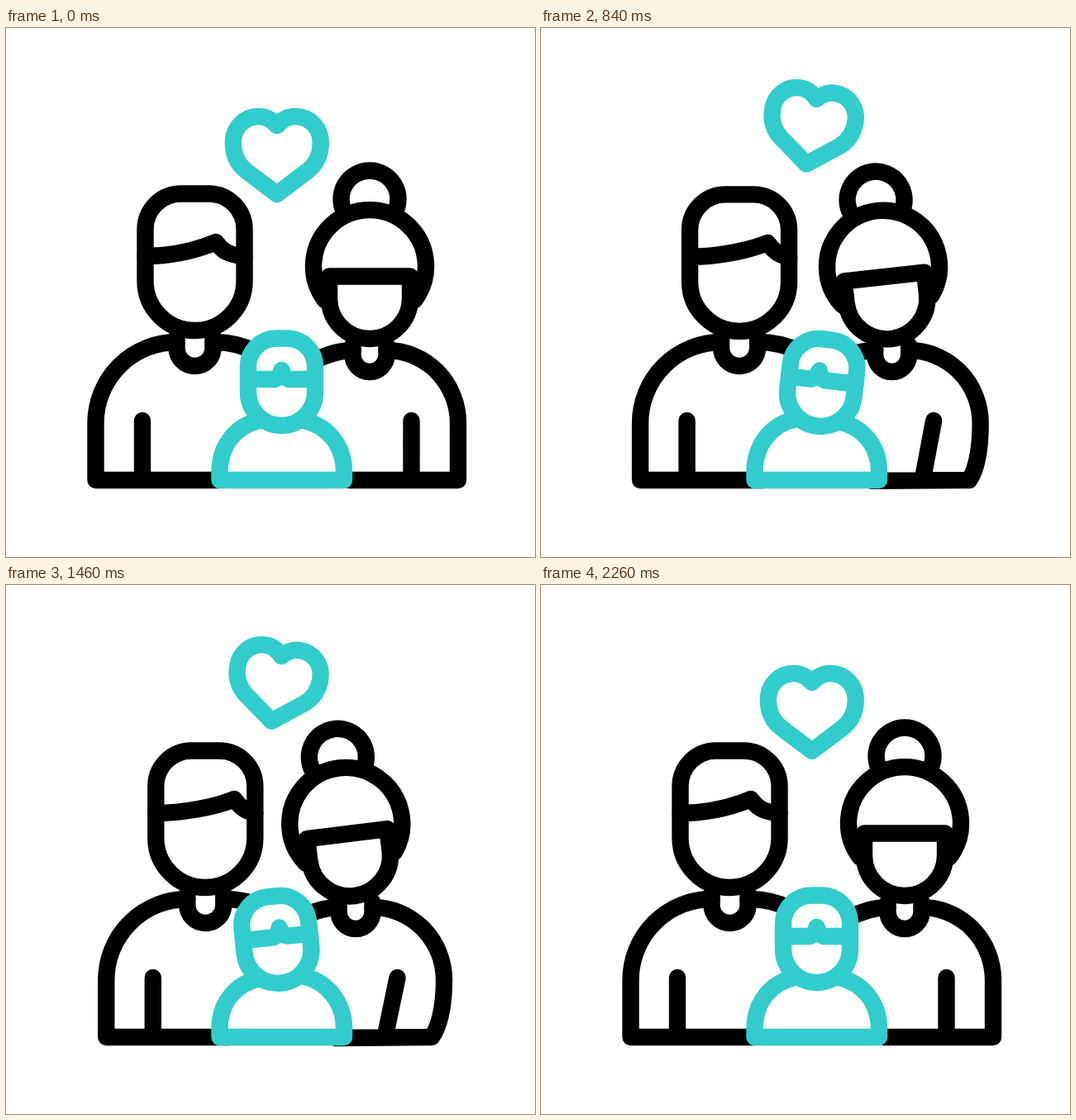
These frames come from a looping animation (640x640 px, 2300 ms). An HTML page:

```html
<!DOCTYPE html>
<html lang="en">
<head>
<meta charset="utf-8">
<title>Family</title>
<style>
  html, body { margin: 0; height: 100%; overflow: hidden; background: #fff; }
  svg { display: block; width: 100%; height: 100%; }
  path { vector-effect: non-scaling-stroke; }
</style>
</head>
<body>
<svg viewBox="0 0 640 640" fill="none" stroke="#000" stroke-width="20.4" stroke-linecap="round" stroke-linejoin="round">
  <g id="man">
    <path d="M206.500 380A98 98 0 0 0 108.500 478V547H258M165 475V547M250.500 380C267 380 284 383 300 391"/>
    <path d="M206.500 374V387A22 22 0 0 0 250.500 387V374"/>
    <g id="manHead">
      <path d="M168.500 243.500A43 43 0 0 1 211.500 200.500H245.500A43 43 0 0 1 288.500 243.500V306A60 60 0 0 1 168.500 306Z"/>
      <path id="manHair"/>
    </g>
  </g>
  <g id="woman">
    <path id="womanBody"/>
    <path d="M419.500 384V395.500A20.500 20.500 0 0 0 460.500 395.500V384"/>
    <g id="womanHead">
      <path d="M410 224A34.500 34.500 0 1 1 470 224"/>
      <path d="M386 329.500A68 68 0 1 1 494 329.500"/>
      <path d="M391 300.500H489V327A49 49 0 0 1 391 327Z"/>
    </g>
  </g>
  <g stroke="#33cccc">
    <path id="childBody" fill="#fff"/>
    <g id="childHead">
      <path fill="#fff" d="M293 409.500A34 34 0 0 1 327 375.500H340A34 34 0 0 1 374 409.500V440.500A40.500 40.500 0 0 1 293 440.500Z"/>
      <path id="childHair"/>
    </g>
    <path id="heart" d="M0 -36C-6 -43 -14 -47 -22 -47C-40 -47 -53 -33 -53 -15C-53 2 -46 12 -37 19L0 47L37 19C46 12 53 2 53 -15C53 -33 40 -47 22 -47C14 -47 6 -43 0 -36Z"/>
  </g>
</svg>
<script>
const LOOP = 2300, HALF = LOOP / 2, QUARTER = LOOP / 4;
const el = id => document.getElementById(id);
const move = (id, transform) => el(id).setAttribute('transform', transform);
const draw = (id, d) => el(id).setAttribute('d', d);
const clamp = v => Math.min(1, Math.max(0, v));

// Cubic Bézier easing, solved by bisection
function bezier(x1, y1, x2, y2) {
  const at = (a, b, s) => 3 * a * s * (1 - s) ** 2 + 3 * b * s * s * (1 - s) + s ** 3;
  return x => {
    let low = 0, high = 1;
    for (let i = 0; i < 24; i++) {
      const mid = (low + high) / 2;
      if (at(x1, x2, mid) < x) low = mid; else high = mid;
    }
    return at(y1, y2, low);
  };
}
const ease = bezier(.25, .1, .25, 1);
const easeIn = bezier(.45, 0, .85, .85);
const easeInOut = bezier(.5, 0, .5, 1);
const smooth = x => x * x * (3 - 2 * x);
const arch = x => Math.sin(Math.PI * x) ** 2;
const span = (t, from, to, curve) => curve(clamp((t - from) / (to - from)));

function adults(t) {
  const lean = span(t, 0, 1340, ease) - span(t, 1460, 2060, ease);
  const bob = 2.6 * (span(t, 0, 700, arch) + span(t, 700, 1400, arch));
  move('man', `translate(${12.8 * lean} 0)`);
  move('manHead', `translate(0 ${bob})`);
  const peak = 254 + 9.5 * lean;
  draw('manHair', `M168.500 276C200 276 ${peak - 24} 269 ${peak} 259C${peak + 7} 269 ${peak + 15} 275 288.500 276`);

  move('woman', `translate(${-17 * lean} 0)`);
  move('womanHead', `rotate(${-7 * lean} 440 385)`);
  draw('womanBody', `M372 403C390 394 405 390 419.500 390M460.500 390A86.500 88 0 0 1 547 478` +
    `C547 510 ${547 - 6 * lean} 535 ${547 - 15 * lean} 547L415 ${547 + lean}` +
    `M490.500 475L${490.5 - 15 * lean} 547`);
}

function child(t) {
  const tilt = 8 * span(t, 0, 640, smooth) - 15.5 * span(t, 640, 1660, smooth) + 7.5 * span(t, 1660, 2260, smooth);
  move('childHead', `translate(0 ${2 * span(t, 640, 1660, arch)}) rotate(${tilt} 333.500 485)`);

  const tuft = 333.5 - .75 * tilt;
  draw('childHair', `M293 425H${tuft - 8.5}Q${tuft - 2.5} 423 ${tuft} 414Q${tuft + 2.5} 423 ${tuft + 8.5} 425H374`);

  const left = 474.5 - .2 * tilt, right = 474.5 + .2 * tilt;
  draw('childBody', `M308 ${left}C279 ${left + 6} 258.500 504 258.500 537V547H409V537C409 504 388 ${right + 6} 359 ${right}`);
}

function heart(t) {
  const m = Math.min(t, LOOP - t), u = m / HALF;
  const scale = m < QUARTER ? 1 - .16 * easeIn(m / QUARTER) : .84 + .253 * (m - QUARTER) / QUARTER;
  const turn = easeInOut(u);
  move('heart', `translate(${327.8 + .3 * turn} ${154 - 55.5 * easeIn(u)}) rotate(${10 * turn}) scale(${scale})`);
}

function frame(now) {
  const t = now % LOOP;
  adults(t);
  child(t);
  heart(t);
  requestAnimationFrame(frame);
}
frame(0);
</script>
</body>
</html>
```
